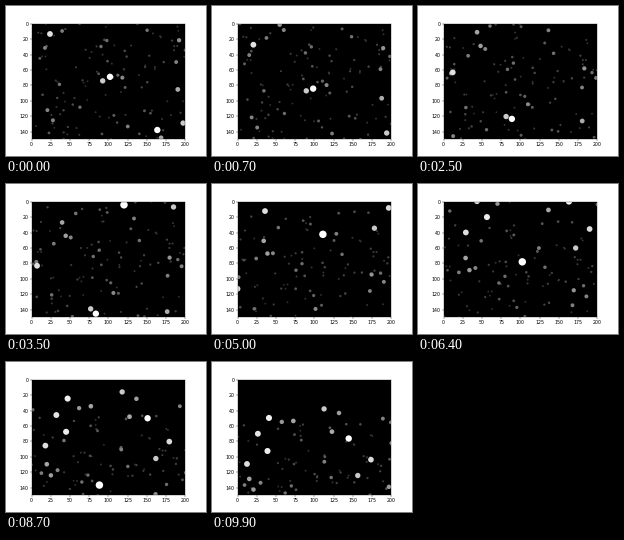
Animation of 200 by 150 pixels, one loop 10000 ms. Source, as a matplotlib script:

```python
import numpy as np
import matplotlib.pyplot as plt
from matplotlib.animation import FuncAnimation

W, H = 200, 150
FRAMES = 100
WIND = -0.24  # sideways drift per unit of fall
NEAREST = 2.5  # fall per frame at depth 1

# The closest flakes: start x, start y, fall per frame.
CLOSE = [
    (141.7, -85.9, 2.56), (102, 68.8, 2.19), (92.5, 74, 1.86),
    (24, 13, 2.0), (163.5, 138, 2.19), (197, 129, 1.85),
    (59.6, -87.7, 1.99), (220, -90.3, 1.96), (74.7, -131, 2.03),
    (88.4, -113.5, 2.08), (196.8, -141.6, 2.2), (90.8, -158.5, 2.1),
]


def scattered(n, rng):
    """Flakes in a box of snow, seen in perspective from its centre."""
    speed = NEAREST / rng.uniform(1.35, 4.0, n)
    x = W / 2 + speed * rng.uniform(-150, 150, n)
    y = H / 2 + speed * rng.uniform(-124, 124, n)
    return np.column_stack([x, y, speed])


flakes = np.vstack([scattered(245, np.random.default_rng(12)), CLOSE])
flakes = flakes[np.argsort(flakes[:, 2])]
start, speed = flakes[:, :2], flakes[:, 2]
velocity = np.outer(speed, [WIND, 1])

plt.rcParams["xtick.labelsize"] = plt.rcParams["ytick.labelsize"] = 11
fig = plt.figure(figsize=(6.4, 4.8), dpi=31.25)
ax = fig.add_axes((0.1275, 0.112, 0.7695, 0.768), facecolor="black")
ax.set_xlim(0, W)
ax.set_ylim(H, 0)
ax.set_xticks(range(0, W + 1, 25))
ax.set_yticks(range(0, H, 20))

light = np.clip(speed / 2.2, 0, 1) ** 1.35
snow = ax.scatter(*start.T, s=(6.7 * speed) ** 2, linewidths=0,
                  c=np.column_stack([light] * 3))


def update(i):
    snow.set_offsets(start + velocity * i)
    return snow,


anim = FuncAnimation(fig, update, frames=FRAMES, interval=100,
                     repeat=True, repeat_delay=0)
plt.show()
```
